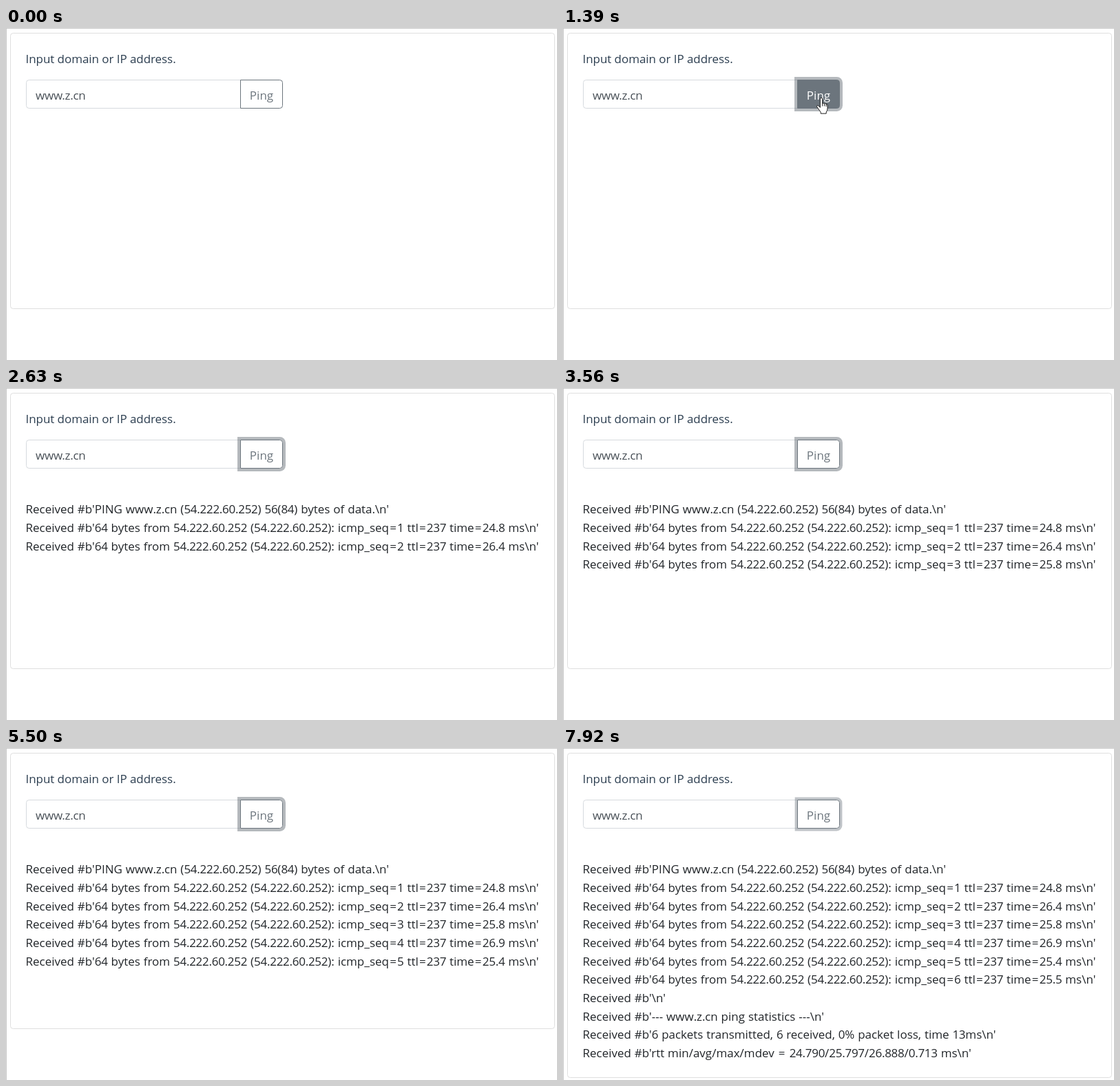
An HTML page for the animation above (7.99 s loop, 800 by 482 pixels).

```html
<!DOCTYPE html>
<html lang="en">
<head>
<meta charset="utf-8">
<title>Ping</title>
<style>
  html, body { margin: 0; width: 100%; height: 100%; overflow: hidden; background: #fff; }
  #stage {
    position: relative; width: 800px; height: 482px; overflow: hidden; box-sizing: border-box;
    border: solid #c9c9c9; border-width: 1px 0 0 1px;
    font: 17px/23px "Open Sans", "Noto Sans", sans-serif; color: #212529;
  }
  #stage > * { position: absolute; box-sizing: border-box; white-space: pre; }
  #card { left: 5px; top: 6px; width: 791px; height: 401px; border: 1px solid #dfdfdf; border-radius: 4.4px; }
  #label { left: 27.5px; top: 32px; color: #2c3e50; letter-spacing: -.06px; }
  #field {
    left: 28px; top: 74px; width: 312px; height: 42px; padding: 10px 13px;
    border: 1px solid #d6dade; border-radius: 4.4px 0 0 4.4px;
    color: #495057; letter-spacing: -.25px;
  }
  #button {
    left: 339px; top: 74px; width: 62px; height: 42px; padding: 10px 0; text-align: center;
    border: 1px solid #6c757d; border-radius: 0 4.4px 4.4px 0; color: #6c757d;
  }
  .row { left: 27.5px; word-spacing: .45px; }
  .num { letter-spacing: -.28px; }
  .eq { margin: 0 1.2px; }
  svg { left: -1px; top: -1px; width: 1px; height: 1px; overflow: visible; opacity: 0; }
  path { fill: #fff; stroke: #222; stroke-linejoin: round; }
</style>
</head>
<body>
<div id="stage">
  <div id="card"></div>
  <div id="label">Input domain or IP address.</div>
  <div id="field">www.z.cn</div>
  <div id="button">Ping</div>
  <svg id="arrow"><path d="M.5 .5V18L4.4 14.3L7 20.6L9.6 19.5L7 13.2H12.8Z"/></svg>
  <svg id="hand">
    <path d="M-1.6 14V2a1.6 1.6 0 0 1 3.2 0v6.5q1.5-1 2.8 .3q1.6-.8 2.6 .6q2-.2 2 1.6v5q0 3-1.8 5v2.2h-8v-2L-6.2 13.6q-.8-2 .9-2.2q1.4 0 3.7 3z"/>
    <path d="M1.6 8.5v4M4.4 9v3.5M7 9.5v3.5"/>
  </svg>
</div>
<script>
  const LOOP = 7990;
  const $ = id => document.getElementById(id);

  // Plays held states, each given as [time in ms, properties].
  function hold(el, states) {
    const frames = states.map(([t, props]) => ({ ...props, offset: t / LOOP, easing: "steps(1, end)" }));
    frames.push({ ...states[states.length - 1][1], offset: 1 });
    el.animate(frames, { duration: LOOP, iterations: Infinity });
  }

  // Console output
  const ip = "54.222.60.252";
  const times = [24.8, 26.4, 25.8, 26.9, 25.4, 25.5];
  const shown = [1620, 2630, 3560, 4570, 5500, 6510];
  const END = 6590;
  const rows = [
    [1620, `PING www.z.cn (${ip}) 56(84) bytes of data.`],
    ...times.map((ms, i) => [shown[i], `64 bytes from ${ip} (${ip}): icmp_seq=${i + 1} ttl=237 time=${ms} ms`]),
    [END, ""],
    [END, "--- www.z.cn ping statistics ---"],
    [END, "6 packets transmitted, 6 received, 0% packet loss, time 13ms"],
    [END, "rtt min/avg/max/mdev = 24.790/25.797/26.888/0.713 ms"]
  ];
  rows.forEach(([t, text], i) => {
    const row = document.createElement("div");
    row.className = "row";
    row.style.top = Math.round(182.4 + i * 26.667) - 19 + "px";
    row.innerHTML = `Received #b'${text}\\n'`.replace(/[\d.]+|=/g,
      s => `<span class=${s === "=" ? "eq" : "num"}>${s}</span>`);
    $("stage").insertBefore(row, $("arrow"));
    hold(row, [[0, { opacity: 0 }], [t, { opacity: 1 }]]);
  });
  hold($("card"), [[0, { height: "401px" }], [END, { height: "472px" }]]);

  // Button: fill is the hover amount, ring the focus amount
  function face(fill, ring) {
    const mix = c => Math.round(c + (255 - c) * fill);
    return {
      backgroundColor: `rgba(108,117,125,${fill})`,
      color: `rgb(${mix(108)},${mix(117)},${mix(125)})`,
      boxShadow: `0 0 0 ${4 * ring}px rgba(108,117,125,${.5 * ring})`
    };
  }
  hold($("button"), [
    [0, face(0, 0)], [924, face(.2, 0)], [1002, face(.75, 0)], [1080, face(1, 0)],
    [1310, face(1, .5)], [1390, face(1, 1)],
    [1780, face(.85, 1)], [1860, face(.43, 1)], [1940, face(0, 1)], [7920, face(0, .85)]
  ]);

  // Pointer: glides in, presses, drifts off to the right
  const STEP = 78;
  const track = [];
  for (let i = 0; i <= 10; i++) {
    const left = (1 - i / 10) ** 2;
    track.push([300 + STEP * i, 375 + 311 * left, 101 + 361 * left]);
  }
  track.push(
    [1700, 384, 103], [1780, 412, 102], [1860, 444.5, 102], [1940, 464, 102], [2010, 474, 103],
    [2320, 490, 112], [2400, 536, 139], [2480, 592, 171], [2550, 690, 228]
  );
  const hidden = { opacity: 0, transform: "none" };
  const overButton = (x, y) => x < 402 && y < 117;
  for (const id of ["arrow", "hand"]) {
    hold($(id), [
      [0, hidden],
      ...track.map(([t, x, y]) => [t, {
        opacity: overButton(x, y) === (id === "hand") ? 1 : 0,
        transform: `translate(${x}px, ${y}px)`
      }]),
      [2630, hidden]
    ]);
  }
</script>
</body>
</html>
```
